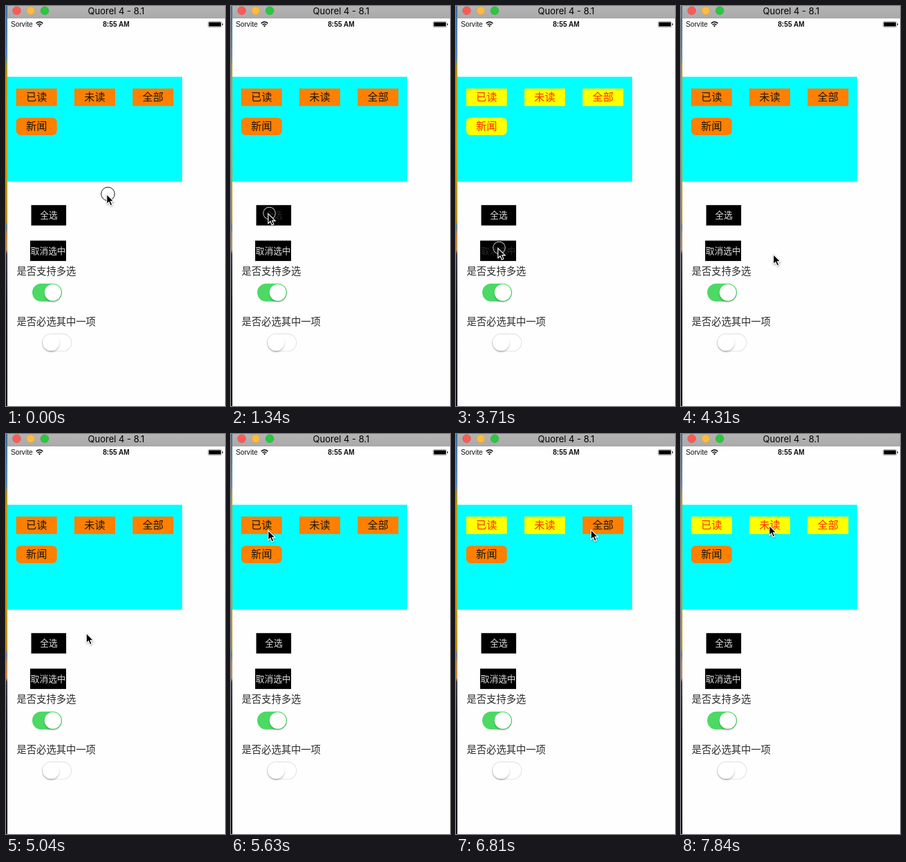
Write an HTML page that moves like this. It is 317 by 579 pixels and loops after 7990 ms.

```html
<!DOCTYPE html>
<html lang="zh-CN">
<head>
<meta charset="utf-8">
<style>
html, body { margin: 0; width: 100%; height: 100%; overflow: hidden; background: #fff; }
svg { display: block; width: 100vw; height: 100vh; }
text { font-family: "Noto Sans CJK SC", sans-serif; font-weight: 300; }
.bar { font: 10.2px "Liberation Sans", Arial, sans-serif; }
.title { font: 13px Inter, sans-serif; }
</style>
</head>
<body>
<svg viewBox="0 0 317 579" preserveAspectRatio="none">
  <defs>
    <linearGradient id="desk" x1="0" y1="0" x2="0" y2="1">
      <stop offset="0" stop-color="#3f6f9f"/>
      <stop offset=".13" stop-color="#5b8fc0"/>
      <stop offset=".15" stop-color="#b79a1c"/>
      <stop offset=".35" stop-color="#c9a412"/>
      <stop offset=".54" stop-color="#c0930f"/>
      <stop offset=".55" stop-color="#5f83ad"/>
      <stop offset=".57" stop-color="#c08a4a"/>
      <stop offset=".61" stop-color="#c98d52"/>
      <stop offset=".62" stop-color="#3b3d4c"/>
      <stop offset=".75" stop-color="#1b1c26"/>
      <stop offset="1" stop-color="#15151b"/>
    </linearGradient>
    <linearGradient id="chrome" x1="0" y1="0" x2="0" y2="1">
      <stop offset="0" stop-color="#b4b4b4"/>
      <stop offset="1" stop-color="#a9a9a9"/>
    </linearGradient>
    <filter id="soft" x="-30%" y="-30%" width="160%" height="170%">
      <feDropShadow dx="0" dy="1.6" stdDeviation="1" flood-color="#000" flood-opacity=".3"/>
    </filter>
    <filter id="lift" x="-30%" y="-20%" width="170%" height="150%">
      <feDropShadow dx=".3" dy=".8" stdDeviation=".8" flood-color="#000" flood-opacity=".45"/>
    </filter>
  </defs>

  <rect width="317" height="579" fill="#fefefe"/>
  <rect width="2" height="579" fill="url(#desk)"/>

  <rect x="2" width="315" height="18" fill="url(#chrome)"/>
  <g stroke-width=".6">
    <circle cx="15.5" cy="6.7" r="5.8" fill="#fc5b57" stroke="#df4744"/>
    <circle cx="35.8" cy="6.7" r="5.8" fill="#fdbc40" stroke="#de9f34"/>
    <circle cx="56" cy="6.7" r="5.8" fill="#29c83f" stroke="#27aa35"/>
  </g>
  <text class="title" x="159.5" y="11.8" text-anchor="middle" fill="#000">Quorel 4 - 8.1</text>

  <text class="bar" x="7" y="30.2" fill="#111">Sorvite</text>
  <g fill="none" stroke="#000" stroke-width="1.5">
    <path d="M43.6 25.2Q48.5 20.8 53.4 25.2"/>
    <path d="M45.5 27.3Q48.5 24.6 51.5 27.3"/>
  </g>
  <path d="M46.9 28.6Q48.5 27.4 50.1 28.6L48.5 30.4Z"/>
  <text class="bar" x="159.5" y="30.2" text-anchor="middle" style="font-weight:700" fill="#111">8:55 AM</text>
  <rect x="292.6" y="22.6" width="19.4" height="8" rx="1.4" fill="none" stroke="#777" stroke-width=".6"/>
  <rect x="293.6" y="23.6" width="17.4" height="6" rx=".7"/>
  <path d="M312.8 25.1q1.3 .4 1.3 1.5t-1.3 1.5z"/>

  <rect x="2" y="102.5" width="253" height="151.9" fill="#0ff"/>
  <g id="tags"></g>

  <rect x="36.5" y="288.2" width="50.6" height="29.5"/>
  <rect x="35" y="339.6" width="52" height="29.5"/>
  <g id="labels"></g>

  <rect x="38" y="401.8" width="43" height="26" rx="13" fill="#4cd964"/>
  <circle cx="67.8" cy="414.8" r="12" fill="#fff" filter="url(#soft)"/>
  <rect x="52.4" y="474.6" width="42.4" height="25.2" rx="12.6" fill="#fff" stroke="#e3e3e3" stroke-width="1.1"/>
  <circle cx="65.2" cy="487" r="12" fill="#fff" filter="url(#soft)"/>

  <g id="cursor">
    <g id="ring" fill="none">
      <circle cx="2.5" r="8.9" stroke="#fff"/>
      <circle cx="2.5" r="9.8" stroke="#000" stroke-width=".9"/>
    </g>
    <path d="M.8 .6V14.8L4 11.8L6.2 17L8.8 15.9L6.6 10.9H11Z" fill="#000" stroke="#fff" stroke-width="1.1" filter="url(#lift)"/>
  </g>
</svg>
<script>
const LOOP = 7990;
const NS = "http://www.w3.org/2000/svg";
const byId = id => document.getElementById(id);

function add(parent, name, attrs, content) {
  const el = document.createElementNS(NS, name);
  for (const k in attrs) el.setAttribute(k, attrs[k]);
  if (content) el.textContent = content;
  return parent.appendChild(el);
}

// Text placed by the middle of its line
function label(parent, str, x, cy, size, fill, anchor = "middle") {
  return add(parent, "text", {
    x, y: cy + size * 0.33, "font-size": size, fill, "text-anchor": anchor
  }, str);
}

// Each tag: name, column, row, corner radius, selected spans
const tags = [
  ["已读", 0, 0, 0, [[1630, 3850], [6080, LOOP]]],
  ["未读", 1, 0, 0, [[1630, 3850], [6520, LOOP]]],
  ["全部", 2, 0, 0, [[1630, 3850], [7260, LOOP]]],
  ["新闻", 0, 1, 6.5, [[1630, 3850]]]
].map(([name, col, row, rx, spans]) => {
  const x = 14.7 + col * 84.3, y = 119.5 + row * 42.2;
  const box = add(byId("tags"), "rect", { x, y, width: 59, height: 25.3, rx });
  return { box, text: label(byId("tags"), name, x + 29.5, y + 12.4, 15.2), spans };
});

const labels = byId("labels");
const buttons = [
  { text: label(labels, "全选", 62, 303, 12.7, "#ddd"), down: 1340 },
  { text: label(labels, "取消选中", 61.2, 354.4, 12.7, "#ddd"), down: 3560 }
];
label(labels, "是否支持多选", 15.5, 384.6, 14.3, "#2a2a2a", "start");
label(labels, "是否必选其中一项", 15.5, 456.8, 14.3, "#2a2a2a", "start");

const taps = [[0, 150], [1340, 1630], [3560, 3850], [5930, 6080], [6380, 6520], [7110, 7260]];

// Pointer moves: first step, last step, steps, bend x y, end x y
const start = [145, 272];
const moves = [
  [150, 740, 5, 75, 298, 53, 300],
  [2080, 2970, 7, 182, 366, 60, 350],
  [4000, 4600, 5, 155, 359, 136, 363],
  [4890, 4890, 1, 139, 365, 142, 366],
  [5040, 5630, 5, 70, 150, 53, 139],
  [6230, 6230, 1, 84, 139, 114, 139],
  [6660, 6810, 2, 160, 138, 194.5, 138],
  [7400, 7400, 1, 180, 141, 161, 143],
  [7690, 7840, 2, 140, 137, 127, 132]
];

const within = (t, spans) => spans.some(([a, b]) => t >= a && t < b);

function pointer(t) {
  let p = start;
  for (const [t0, t1, n, bx, by, x, y] of moves) {
    if (t < t0) break;
    const gap = n > 1 ? (t1 - t0) / (n - 1) : 1;
    const u = Math.min(n, 1 + Math.floor((t - t0) / gap + 0.04)) / n, v = 1 - u;
    const bend = (a, b, c) => v * v * a + 2 * u * v * b + u * u * c;
    p = [bend(p[0], bx, x), bend(p[1], by, y)];
  }
  return p;
}

function draw(t) {
  for (const { box, text, spans } of tags) {
    const on = within(t, spans);
    box.setAttribute("fill", on ? "#ff0" : "#ff8000");
    text.setAttribute("fill", on ? "#ff2a00" : "#1a1508");
  }
  for (const { text, down } of buttons) {
    const d = t - down;
    text.setAttribute("opacity", d < 0 || d >= 440 ? 1 : d < 290 ? 0.18 : 0.6);
  }
  byId("ring").setAttribute("visibility", within(t, taps) ? "visible" : "hidden");
  byId("cursor").setAttribute("transform", `translate(${pointer(t)})`);
}

const begin = performance.now();
function tick() {
  draw((performance.now() - begin) % LOOP);
  requestAnimationFrame(tick);
}
tick();
</script>
</body>
</html>
```
